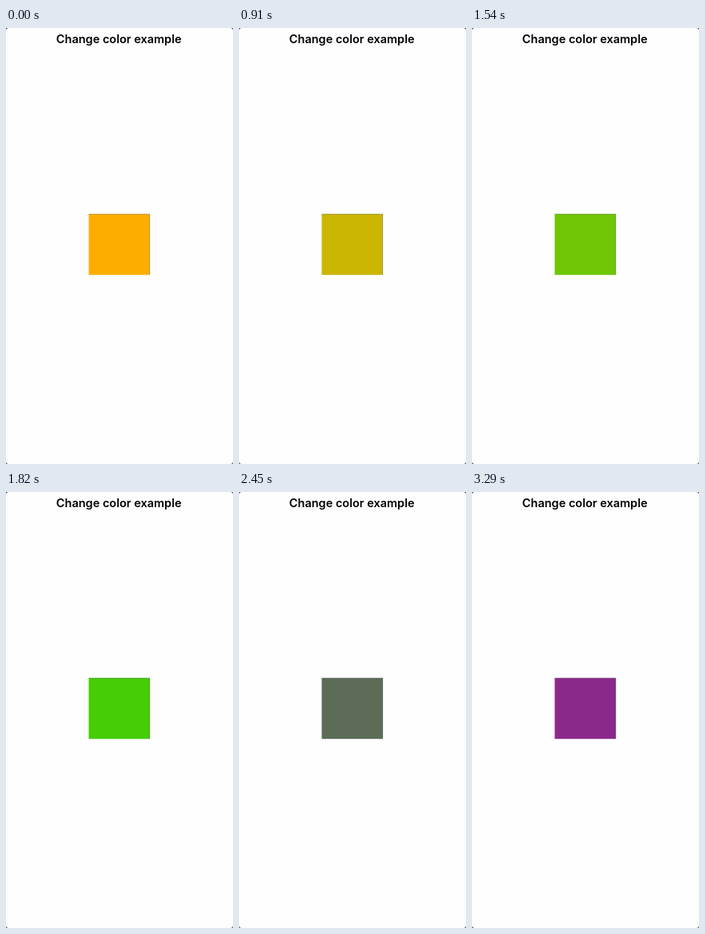
Animation of 284 by 546 pixels, one loop 3920 ms. Source, as an HTML page:

```html
<!DOCTYPE html>
<html lang="en">
<head>
<meta charset="utf-8">
<title>Change color example</title>
<style>
  html, body { margin: 0; width: 100%; height: 100%; overflow: hidden; background: #555; }
  svg { display: block; }
  text { font: 600 14.5px Inter, sans-serif; text-anchor: middle; }
  g { filter: blur(.35px); }
</style>
</head>
<body>
<svg width="284" height="546" viewBox="0 0 284 546">
  <rect width="284" height="546" rx="3.5" fill="#fefefe"/>
  <text x="141.2" y="19">Change color example</text>
  <g>
    <rect id="box" x="103.5" y="232.8" width="76.6" height="76.4"/>
    <path d="M103.5 233.3H179.6V309.2" fill="none" stroke="#667" stroke-opacity=".4"/>
  </g>
</svg>
<script>
const LOOP = 3920, STEP = 140;
const keys = [
  { at: 580, rgb: [251, 174, 0] },
  { at: 1820, rgb: [70, 205, 5] },
  { at: 2100, rgb: [66, 159, 56] },
  { at: 2450, rgb: [92, 108, 88] },
  { at: 2870, rgb: [139, 41, 138] }
];
const box = document.getElementById("box");

// The colour advances in steps; the middle stretch runs half a step out of phase.
function snap(t) {
  const phase = t >= 1260 && t < 2310 ? 0 : STEP / 2;
  return Math.floor((t - phase) / STEP) * STEP + phase;
}

function colorAt(t) {
  const i = keys.findIndex(k => k.at > t);
  if (i === 0) return keys[0].rgb;
  if (i < 0) return keys.at(-1).rgb;
  const a = keys[i - 1], b = keys[i];
  const p = (t - a.at) / (b.at - a.at);
  return a.rgb.map((v, c) => Math.round(v + (b.rgb[c] - v) * p));
}

function draw() {
  const t = snap(performance.now() % LOOP);
  box.setAttribute("fill", `rgb(${colorAt(t)})`);
  requestAnimationFrame(draw);
}
draw();
</script>
</body>
</html>
```
